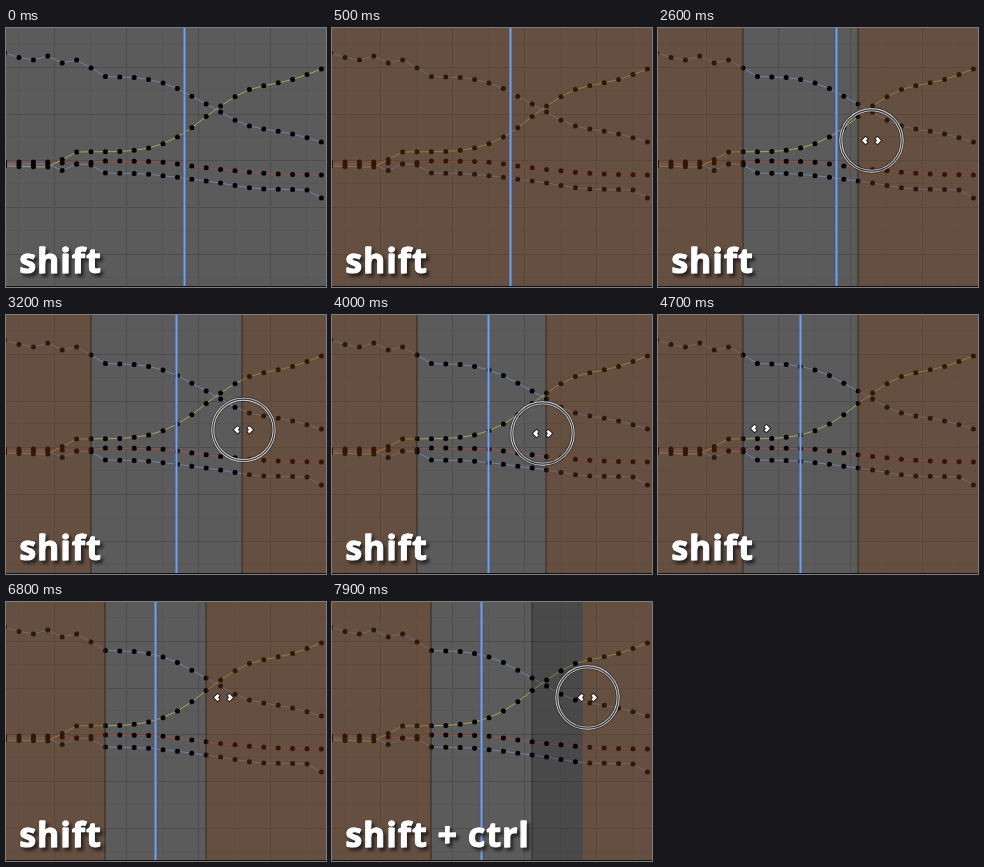
Animation of 320x259 px, one loop 8 s. Source, as an HTML page with a canvas:

```html
<!DOCTYPE html>
<html lang="en">
<head>
<meta charset="utf-8">
<title>Range selection</title>
<style>
  html, body { margin: 0; width: 100%; height: 100%; overflow: hidden; background: #5b5b5b; }
  canvas { display: block; width: 100vw; height: 100vh; }
</style>
</head>
<body>
<canvas id="stage" width="320" height="259"></canvas>
<script>
const W = 320, H = 259, LOOP = 8000, STEP = 100;
const FRAME = 7.2, ORIGIN = 85, KEYS = 23;
const c = document.getElementById('stage').getContext('2d');

// Smooth curve through a few points, without overshoot.
function spline(points) {
  const secant = i => (points[i + 1][1] - points[i][1]) / (points[i + 1][0] - points[i][0]);
  const last = points.length - 1;
  const slopes = points.map((_, i) => {
    if (i === 0) return secant(0);
    if (i === last) return secant(last - 1);
    const a = secant(i - 1), b = secant(i);
    return a * b > 0 ? 2 * a * b / (a + b) : 0;
  });
  return x => {
    if (x <= points[0][0]) return points[0][1];
    const n = points.findIndex(p => p[0] >= x);
    if (n < 0) return points[last][1];
    const [x0, y0] = points[n - 1], [x1, y1] = points[n];
    const h = x1 - x0, u = (x - x0) / h, v = 1 - u;
    return y0 * v * v * (1 + 2 * u) + y1 * u * u * (3 - 2 * u)
      + h * u * v * (v * slopes[n - 1] - u * slopes[n]);
  };
}

// Animation curves: key index and height, one key every two frames.
const keyX = i => -1.4 + i * FRAME * 2;
const curves = [
  ['#7280ad', [[0, 25], [2, 32], [3, 28], [4, 35], [5, 32], [7, 48.5], [9, 49.5], [11, 55], [14, 76], [17, 98], [20, 106], [22, 114]]],
  ['#a64c4c', [[0, 134], [3, 134], [5, 136], [7, 133], [10, 133.5], [15, 141.5], [19, 146], [22, 147]]],
  ['#7280ad', [[0, 136], [3, 136], [4, 142.5], [5, 136], [6, 137], [7, 145], [9, 145.5], [14, 153], [18, 161], [21, 162], [22, 170]]],
  ['#a9a650', [[0, 138], [3, 139], [5, 124], [8, 123.5], [10, 120], [12, 109], [15, 78], [17, 61.5], [20, 51.5], [22, 41]]]
].map(([color, points]) => {
  const curve = spline(points);
  return { color, dots: Array.from({ length: KEYS }, (_, i) => [keyX(i), curve(i)]) };
});

const pointerX = spline([
  [1100, 301], [1700, 87], [2000, 87], [2500, 200], [2600, 213], [2800, 257], [3000, 238],
  [3400, 236], [3800, 223], [4000, 210], [4100, 202], [4800, 85], [5000, 54], [5200, 77],
  [5400, 92], [5500, 103], [5700, 101], [6100, 137], [6800, 217], [7000, 217], [7900, 255]
]);
const pointerY = spline([[1100, 145], [1700, 117], [2600, 112], [4000, 118], [5500, 104], [6800, 95], [7900, 95]]);
const presses = [[1900, 4200], [4800, 5700], [7100, LOOP]];

const snap = x => ORIGIN + Math.round((x - ORIGIN) / FRAME) * FRAME;
const dragged = (t, end) => snap(pointerX(Math.min(t, end) - 100));
const leftEdge = t => t < 4900 ? ORIGIN : dragged(t, 5700);
const rightEdge = t => t < 2100 ? ORIGIN : dragged(t, 4200);
const playhead = t => t < 3000 ? 178.6 : snap((leftEdge(t - 200) + rightEdge(t - 200)) / 2);

function box(x, y, w, h, color) {
  c.fillStyle = color;
  c.fillRect(x, y, w, h);
}

function gridLines(x0, y0, color) {
  for (let x = x0; x < W; x += FRAME * 10) box(x, 0, 1, H, color);
  for (let y = y0; y < H; y += 46.7) box(0, Math.round(y), W, 1, color);
}

function drawGrid() {
  box(0, 0, W, H, '#5b5b5b');
  gridLines(12, 15, '#575757');
  gridLines(48, 39, '#4e4e4e');
}

function drawCurves() {
  c.lineWidth = 1;
  for (const { color, dots } of curves) {
    c.strokeStyle = color;
    c.beginPath();
    dots.forEach(([x, y]) => c.lineTo(x, y));
    c.stroke();
  }
  c.fillStyle = '#000';
  for (const [x, y] of curves.flatMap(k => k.dots)) {
    c.beginPath();
    c.arc(x, y, 2.5, 0, 7);
    c.fill();
  }
}

function drawRange(t) {
  if (t < 400) return;
  const tint = `rgba(112,60,24,${t < 500 ? 0.2 : 0.4})`;
  const l = leftEdge(t), r = rightEdge(t);
  const extending = t >= 7100;
  const outer = extending ? Math.max(r, dragged(t, LOOP)) : r;
  box(0, 0, l, H, tint);
  box(outer, 0, W - outer, H, tint);
  if (extending) box(r, 0, outer - r, H, 'rgba(0,0,0,.2)');
  if (r > l) {
    for (const x of [l, r]) box(Math.floor(x) - 0.5, 0, 1, H, 'rgba(30,20,12,.65)');
  }
}

function drawPlayhead(t) {
  const x = Math.round(playhead(t)) - 2;
  box(x - 0.5, 0, 4, H, 'rgba(60,85,135,.5)');
  box(x + 0.5, 0, 2, H, '#7a9fe2');
}

function ring(x, y, width, color) {
  c.lineWidth = width;
  c.strokeStyle = color;
  c.beginPath();
  c.arc(x, y, 30.7, 0, 7);
  c.stroke();
}

function drawPointer(t) {
  if (t < 1100) return;
  const x = pointerX(t) + 0.5, y = pointerY(t) + 0.5;
  if (presses.some(([a, b]) => t >= a && t < b)) {
    ring(x, y, 5, 'rgba(20,20,20,.4)');
    ring(x, y, 3, '#d6d6d6');
    ring(x, y, 1.2, '#383838');
  }
  for (const side of [-1, 1]) {
    c.beginPath();
    [[9.5, 0], [6, -3.5], [4, -2], [5.5, 0], [4, 2], [6, 3.5]]
      .forEach(([dx, dy]) => c.lineTo(x + side * dx, y + dy));
    c.closePath();
    c.lineWidth = 2;
    c.strokeStyle = 'rgba(15,12,10,.7)';
    c.stroke();
    c.fillStyle = '#fff';
    c.fill();
  }
}

function drawLabel(t) {
  const text = t < 7100 ? 'shift' : 'shift + ctrl';
  c.save();
  c.font = '700 33.5px "Open Sans", "Noto Sans", sans-serif';
  c.letterSpacing = '1.2px';
  c.lineJoin = 'round';
  c.lineWidth = 1;
  c.fillStyle = c.strokeStyle = '#fff';
  c.shadowColor = 'rgba(30,30,30,.9)';
  c.shadowBlur = 3;
  c.shadowOffsetX = c.shadowOffsetY = 2.5;
  c.strokeText(text, 13.5, 245);
  c.fillText(text, 13.5, 245);
  c.shadowColor = 'transparent';
  c.strokeText(text, 13.5, 245);
  c.restore();
}

function draw(now) {
  const t = Math.floor((now % LOOP) / STEP) * STEP;
  drawGrid();
  drawCurves();
  drawRange(t);
  drawPlayhead(t);
  drawPointer(t);
  drawLabel(t);
  box(0, 258, W, 1, '#111');
}

const start = performance.now();
function tick() {
  draw(performance.now() - start);
  requestAnimationFrame(tick);
}
tick();
</script>
</body>
</html>
```
